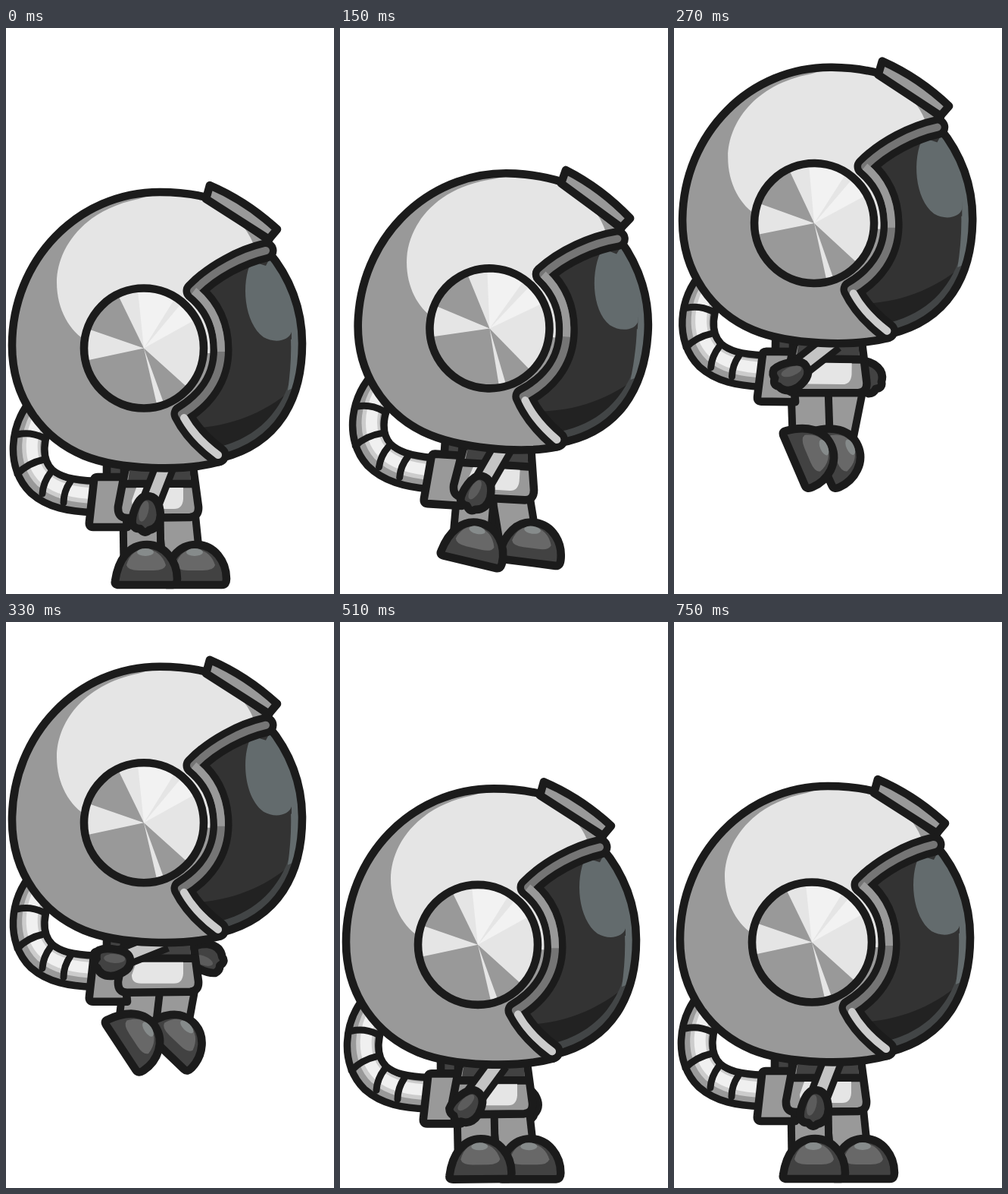
An HTML page for the animation above (900 ms loop, 433 px wide and 745 px high).

```html
<!DOCTYPE html>
<html lang="en">
<head>
<meta charset="utf-8">
<title>Jumping astronaut</title>
<style>
  html, body { margin: 0; width: 100%; height: 100%; overflow: hidden; background: #fff; }
  svg { display: block; width: 100%; height: 100%; }
  .ink { stroke: #1b1b1b; stroke-width: 10.6; stroke-linejoin: round; stroke-linecap: round; }
  .line { fill: none; stroke-linejoin: round; stroke-linecap: round; }
  .limb { fill: none; }
</style>
</head>
<body>
<svg viewBox="0 0 433 745" xmlns="http://www.w3.org/2000/svg">
  <defs>
    <path id="shell" d="M265 223C245 218 224 216 203 216C95 216 8 305 8 418C8 490 50 541 103 563C150 582 235 584 282 571L232 508C262 490 285 462 285 424C285 395 275 368 248 346C274 320 312 300 343 293L347 279Z"/>
    <path id="visor" d="M346 294C375 328 391 370 391 415C391 488 360 547 284 566L232 508C262 490 285 462 285 424C285 395 275 368 248 346C274 320 312 300 346 294Z"/>
    <path id="rim" d="M343 293C312 300 273 320 248 346C275 368 284 395 284 424C284 462 262 490 232 508C243 530 260 547 280 562"/>
    <path id="tube" d="M51 500C25 530 23 574 47 597C63 611 85 616 117 617"/>
    <clipPath id="shellClip"><use href="#shell"/></clipPath>
    <clipPath id="visorClip"><use href="#visor"/></clipPath>
    <g id="foot">
      <path class="ink" fill="#424242" d="M-41 22C-37 -6 -23 -26 1 -26C25 -26 41 -4 41 19Q41 27 35 27L-36 27Q-42 27 -41 22Z"/>
      <path fill="#686868" d="M-26 1C-22 -14 -12 -20 -1 -20C12 -20 22 -12 26 1Q24 8 10 8L-10 8Q-24 8 -26 1Z"/>
      <ellipse cx="-1" cy="-16" rx="11" ry="5" fill="#868b8b"/>
    </g>
    <g id="glove">
      <path class="ink" fill="#424242" d="M1 -24C-12 -24 -20 4 -18 14Q-14 20 -8 19Q-2 27 4 21Q18 18 19 1C18 -16 12 -24 1 -24Z"/>
      <ellipse cx="-4" cy="-3" rx="6" ry="14" transform="rotate(15)" fill="#5c5c5c"/>
    </g>
  </defs>

  <g class="body">
    <use href="#tube" class="line" stroke="#1b1b1b" stroke-width="51"/>
    <use href="#tube" class="line" stroke="#999" stroke-width="32"/>
    <use href="#tube" class="line" stroke="#ccc" stroke-width="24" transform="translate(3 -3)"/>
    <use href="#tube" class="line" stroke="#f0f0f0" stroke-width="15" transform="translate(4 -4)"/>
    <path class="line" stroke="#1b1b1b" stroke-width="9" d="M15 535Q32 531 49 539M15 587Q28 573 50 568M48 613Q49 598 59 585M76 625Q76 610 85 597"/>
    <use href="#glove" id="farHand"/>
  </g>

  <g id="farLeg" class="limb"><path stroke="#1b1b1b" stroke-width="59"/><path stroke="#999" stroke-width="39"/></g>
  <g id="nearLeg" class="limb"><path stroke="#1b1b1b" stroke-width="59"/><path stroke="#999" stroke-width="39"/></g>
  <use href="#foot" id="farFoot"/>
  <use href="#foot" id="nearFoot"/>

  <g class="body">
    <path class="ink" fill="#424242" d="M133 572H156V592H133Z"/>
    <path class="ink" fill="#999" d="M121 591L154 591L160 657L115 657Q109 657 110 650L116 596Q116 591 121 591Z"/>
    <path class="ink" fill="#999" d="M158 578L148 630Q147 645 160 645L243 644Q255 643 254 630L247 578Z"/>
    <path fill="#424242" d="M164 575H242L244 597H161Z"/>
    <path class="ink" fill="none" d="M157 600H249"/>
    <path fill="#e5e5e5" d="M172 605H234V620Q233 633 222 633H178Q166 633 166 622Z"/>
    <g id="arm" class="limb"><path stroke="#1b1b1b" stroke-width="32"/><path stroke="#c4c4c4" stroke-width="14"/></g>
    <use href="#glove" id="nearHand"/>

    <use href="#shell" fill="#999"/>
    <path clip-path="url(#shellClip)" fill="#e5e5e5" d="M175 225C100 240 67 292 67 335C67 370 84 400 108 413L290 430V340L327 285Q319 266 308 256L262 222L205 216Z"/>
    <use href="#shell" class="ink" fill="none"/>
    <path class="ink" fill="#999" d="M269 207Q318 228 358 265L347 278L264 225Z"/>

    <use href="#visor" fill="#333"/>
    <g clip-path="url(#visorClip)">
      <path fill="#222" d="M235 527C295 527 345 506 384 470V580H235Z"/>
      <path fill="#424546" d="M373 470C357 513 325 542 275 553V580H400V470Z"/>
      <path fill="#636b6d" d="M366 335C379 390 378 435 372 477L400 465V335Z"/>
      <path fill="#333" d="M350 300C370 330 377 360 377 410L350 400Z"/>
      <path fill="#636b6d" d="M324 307C310 335 314 388 340 407C356 416 374 411 377 400L378 350L352 296L343 313Z"/>
    </g>
    <use href="#visor" class="ink" fill="none"/>

    <use href="#rim" class="line" stroke="#1b1b1b" stroke-width="29"/>
    <use href="#rim" class="line" stroke="#757575" stroke-width="10"/>
    <path class="limb" stroke="#999" stroke-width="10" d="M248 346C275 368 284 395 284 426"/>
    <path class="line" stroke="#ccc" stroke-width="10" d="M235 513C245 531 261 548 280 562"/>

    <g id="dial" transform="translate(182 421.5)"><circle r="79" fill="#e5e5e5"/></g>
    <circle class="ink" cx="182" cy="421.5" r="79" fill="none"/>
  </g>
</svg>
<script>
  const FRAME = 30, LOOP = 900, LAST = 25, RAD = Math.PI / 180;
  // The jump in ms: crouch, top of the flight, legs spread, touchdown, deepest squash, rest.
  const CROUCH = 120, TOP = 300, SPREAD = 390, LAND = 450, SQUASH = 630, REST = 750;
  const $ = id => document.getElementById(id);
  const bodies = document.querySelectorAll('.body');

  const ramp = (t, from, to) => Math.min(1, Math.max(0, (t - from) / (to - from)));
  const bump = (t, from, peak, to) => ramp(t, from, peak) - ramp(t, peak, to);

  function place(id, x, y, turn) {
    $(id).setAttribute('transform', `translate(${x} ${y}) rotate(${turn})`);
  }

  function limb(id, x1, y1, x2, y2) {
    for (const p of $(id).children) p.setAttribute('d', `M${x1} ${y1}L${x2} ${y2}`);
  }

  function leg(side, hipX, hipY, heel, x, y, turn) {
    place(side + 'Foot', x, y, turn);
    limb(side + 'Leg', hipX, hipY, x - heel * Math.cos(turn * RAD), y - heel * Math.sin(turn * RAD));
  }

  function draw(t) {
    const lean = bump(t, 0, CROUCH, TOP);
    const squash = bump(t, LAND, SQUASH, REST);
    const bodyY = 9.3 * lean - 199 * bump(t, CROUCH, TOP, LAND - 7) + 10 * squash;
    for (const el of bodies)
      el.setAttribute('transform', `translate(${lean} ${bodyY}) rotate(${4.4 * lean} 200 650)`);

    const footY = 706 + squash - 176 * (ramp(t, CROUCH, TOP) - ramp(t, TOP, LAND) ** 1.5);
    const spread = bump(t, TOP, SPREAD, LAND);
    const tuck = bump(t, CROUCH, TOP, 402), lateTuck = bump(t, 135, TOP, 402);
    const hipY = 638 + bodyY;
    leg('near', 179, hipY, 5, 185 + squash - 8 * lean - 31 * spread, footY, 80 * tuck - 1.5 * squash);
    leg('far', 225, hipY, 18, 250 + squash + 8 * lean - 40 * lateTuck + 20 * spread, footY - 2 * spread,
      80 * lateTuck - 38 * spread);

    const swing = ramp(t, CROUCH, 330) - 0.6 * ramp(t, SPREAD, 510) - 0.4 * ramp(t, 600, REST);
    const handX = 185 - 45 * swing, handY = 640 - 36 * swing ** 2;
    limb('arm', 210, 576, handX, handY);
    place('nearHand', handX, handY, 78 * swing);
    place('farHand', 226 + 38 * swing, 630 - 30 * swing ** 4, -85 * swing);
  }

  function wedge(from, to, fill) {
    const at = deg => `${79 * Math.cos(deg * RAD)} ${79 * Math.sin(deg * RAD)}`;
    const p = document.createElementNS('http://www.w3.org/2000/svg', 'path');
    p.setAttribute('d', `M0 0L${at(from)}A79 79 0 0 1 ${at(to)}Z`);
    p.setAttribute('fill', fill);
    $('dial').append(p);
  }

  wedge(42, 70, '#999');
  wedge(77, 168, '#999');
  wedge(199, 244, '#999');
  wedge(264, 302, '#f2f2f2');
  wedge(310, 331, '#f2f2f2');

  const start = performance.now();
  function tick() {
    const t = (performance.now() - start) % LOOP;
    draw(Math.min(LAST, Math.floor(t / FRAME)) * FRAME);
    requestAnimationFrame(tick);
  }

  draw(0);
  requestAnimationFrame(tick);
</script>
</body>
</html>
```
